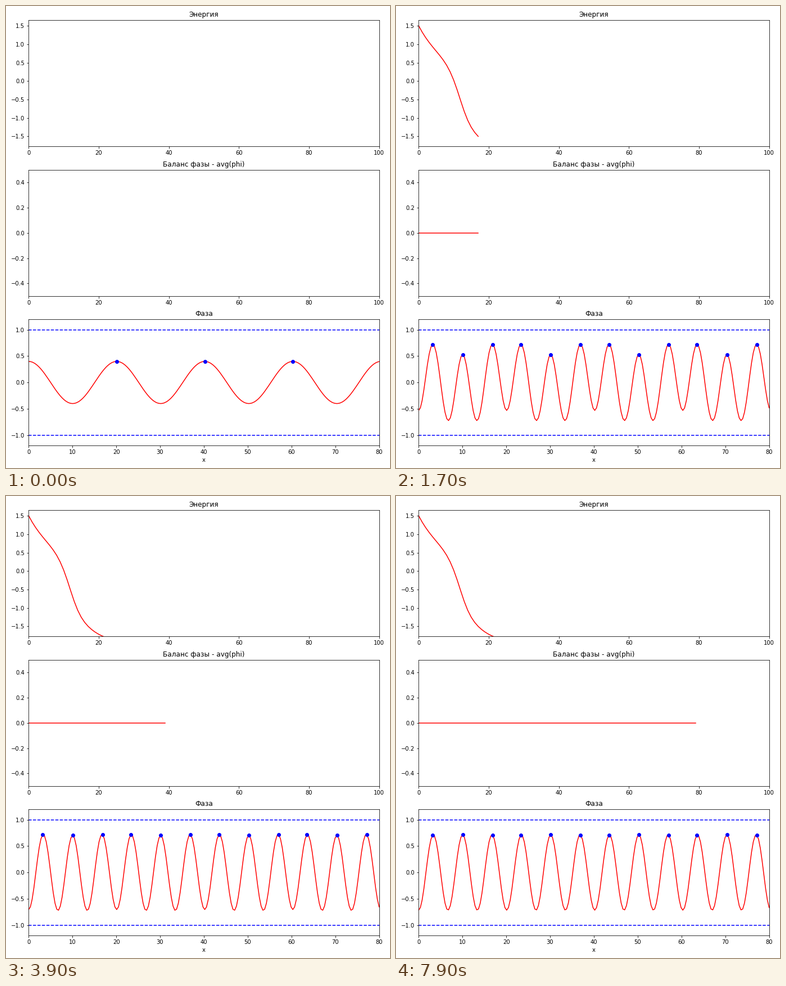
Recreate the animation shown at these times as a matplotlib script. Size 683x820 px, loop 8 s.

```python
import numpy as np
import matplotlib.pyplot as plt
from matplotlib.animation import FuncAnimation

W, H, DPI = 683, 820, 72
FRAMES, INTERVAL = 80, 100

# Phase-field crystal model: u_t = d2/dx2 [ ((1 + d2/dx2)^2 - R) u + u^3 ]
R = 0.4
N, LENGTH = 200, 80
T_END, SUB = 100, 100

x = np.linspace(0, LENGTH, N)
dx = x[1] - x[0]
k2 = (2 * np.pi * np.fft.rfftfreq(N, dx)) ** 2
lin = (1 - k2) ** 2 - R


def simulate():
    """Exponential time stepping; returns one state per unit of time."""
    dt = 1 / SUB
    rate = -k2 * lin
    decay = np.exp(rate * dt)
    safe = np.where(rate == 0, 1, rate)
    gain = np.where(rate == 0, dt, (decay - 1) / safe)
    u = 0.4 * np.cos(8 * np.pi * np.arange(N) / N)
    states = [u]
    v = np.fft.rfft(u)
    for _ in range(T_END):
        for _ in range(SUB):
            v = decay * v - gain * k2 * np.fft.rfft(u ** 3)
            u = np.fft.irfft(v, N)
        states.append(u)
    return np.array(states)


def energy(u):
    lu = np.fft.irfft(lin * np.fft.rfft(u), N)
    f = u * lu / 2 + u ** 4 / 4
    return dx * (f.sum() - (f[0] + f[-1]) / 2)


def peaks(u):
    mid = u[1:-1]
    return np.flatnonzero((mid > u[:-2]) & (mid >= u[2:])) + 1


phi = simulate()
energies = np.array([energy(u) for u in phi])
means = phi.mean(axis=1)
times = np.arange(T_END + 1)

fig = plt.figure(figsize=(W / DPI, H / DPI), dpi=DPI, facecolor="white")


def panel(top, title, xmax, ylim):
    left, width, height = 40.2, 623.5, 224.4
    ax = fig.add_axes([left / W, 1 - (top + height) / H, width / W, height / H])
    ax.set_title(title)
    ax.set_xlim(0, xmax)
    ax.set_ylim(*ylim)
    return ax


ax_e = panel(25.0, "Энергия", 100, (0.9 * energies.min(), 1.1 * energies.max()))
ax_m = panel(290.5, "Баланс фазы - avg(phi)", 100, (-0.5, 0.5))
ax_p = panel(556.0, "Фаза", LENGTH, (-1.2, 1.2))
ax_p.set_xlabel("x")

line_e, = ax_e.plot([], [], "r-")
line_m, = ax_m.plot([], [], "r-")
line_p, = ax_p.plot([], [], "r-")
for level in (-1, 1):
    ax_p.plot([0, LENGTH], [level, level], "b--")
dots, = ax_p.plot([], [], "bo")


def update(i):
    line_e.set_data(times[:i + 1], energies[:i + 1])
    line_m.set_data(times[:i + 1], means[:i + 1])
    u = phi[i]
    top = peaks(u)
    line_p.set_data(x, u)
    dots.set_data(x[top], u[top])
    return line_e, line_m, line_p, dots


anim = FuncAnimation(fig, update, frames=FRAMES, interval=INTERVAL,
                     repeat=True, repeat_delay=0)
plt.show()
```
